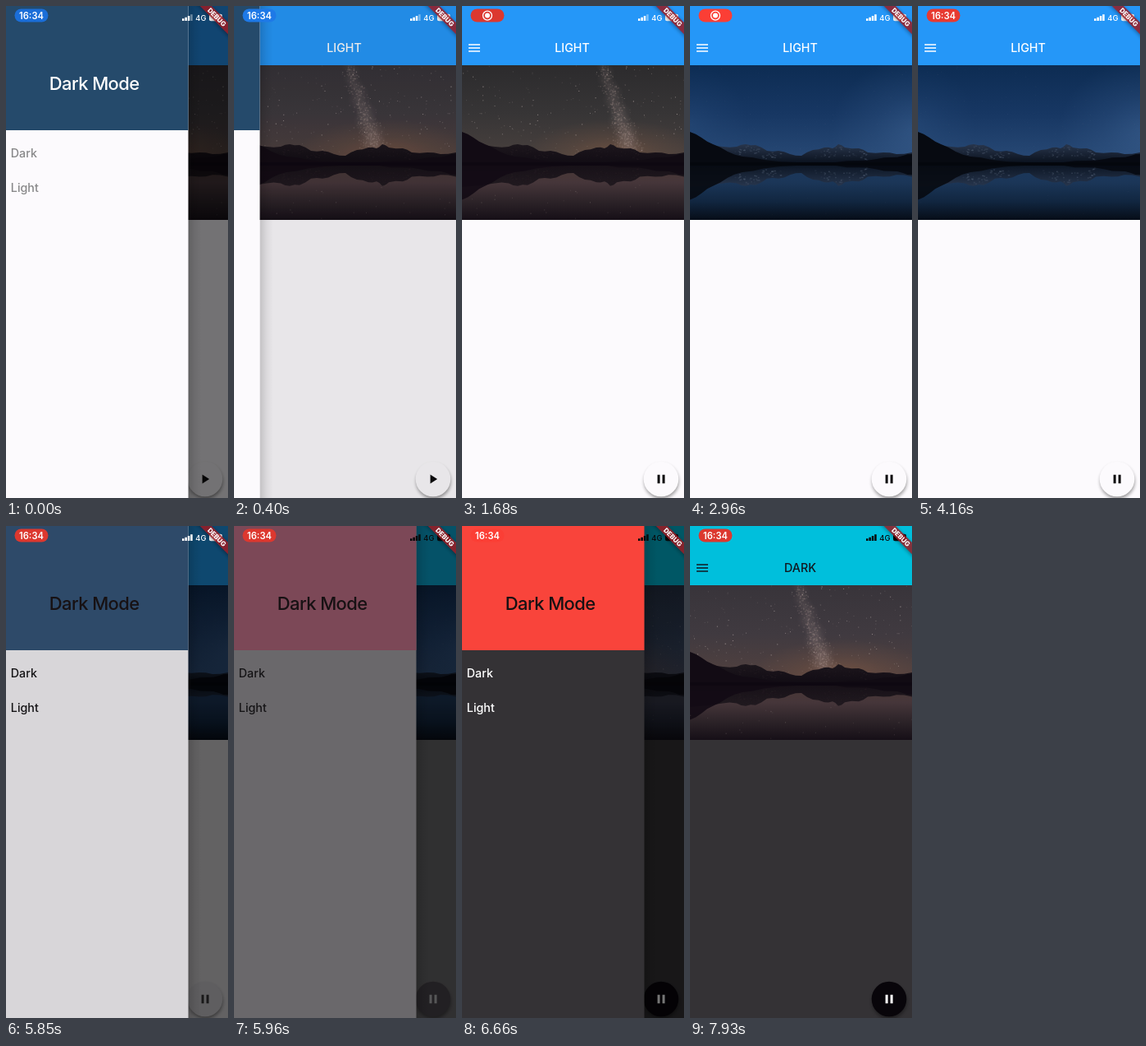
Write an HTML page with a canvas that moves like this. It is 271 px wide and 598 px high and loops after 7.99 s.

```html
<!DOCTYPE html>
<html lang="en">
<head>
<meta charset="utf-8">
<title>Theme drawer</title>
<style>
  html, body { margin: 0; width: 100%; height: 100%; overflow: hidden; background: #fcfafd; }
  canvas { position: absolute; left: 0; top: 72px; width: 271px; height: 189px; }
  svg { position: absolute; left: 0; top: 0; width: 271px; height: 598px; }
  text { font-family: Inter, Roboto, sans-serif; }
  .label { font-size: 14.3px; font-weight: 500; }
  .heading { font-size: 22px; letter-spacing: -.6px; font-weight: 500; }
</style>
</head>
<body>
<canvas id="video" width="271" height="189"></canvas>
<svg viewBox="0 0 271 598">
  <defs>
    <linearGradient id="edge">
      <stop offset="0" stop-opacity=".16"/>
      <stop offset=".5" stop-opacity=".06"/>
      <stop offset="1" stop-opacity="0"/>
    </linearGradient>
    <filter id="soft" x="-30%" y="-30%" width="160%" height="170%">
      <feGaussianBlur stdDeviation="2.2"/>
    </filter>
    <clipPath id="stage"><rect width="271" height="598"/></clipPath>
  </defs>
  <g clip-path="url(#stage)">
    <rect id="bar" width="271" height="72"/>
    <rect id="page" y="260" width="271" height="338"/>
    <g id="barInk">
      <path d="M8 46.2h14v1.6H8zM8 50.2h14v1.6H8zM8 54.2h14v1.6H8z"/>
      <text id="title" class="label" x="134.5" y="56.3" text-anchor="middle"></text>
    </g>
    <circle cx="243.5" cy="578" r="21" opacity=".4" filter="url(#soft)"/>
    <circle id="fab" cx="243" cy="575" r="21.3"/>
    <path id="fabIcon"/>
    <rect id="scrim" width="271" height="598"/>
    <g id="drawer">
      <rect x="222.5" width="16" height="598" fill="url(#edge)"/>
      <rect id="sheet" width="222.5" height="598"/>
      <rect id="header" width="222.5" height="151"/>
      <text id="heading" class="heading" x="107.7" y="102.3" text-anchor="middle">Dark Mode</text>
      <g id="items" class="label">
        <text x="5.8" y="183.8">Dark</text>
        <text x="5.8" y="225.8">Light</text>
      </g>
    </g>
    <rect id="pill" x="10.5" y="3.5" width="41" height="16" rx="8"/>
    <text id="clock" x="31" y="15.5" font-size="11.2" font-weight="600" fill="#fff" text-anchor="middle">16:34</text>
    <g id="record">
      <circle cx="31" cy="11.6" r="5.5" fill="none" stroke="#fff" stroke-width="1.3"/>
      <circle cx="31" cy="11.6" r="3" fill="#fff"/>
    </g>
    <g id="status">
      <path d="M215 15.2h2.5V18H215zM218.4 13.8h2.5V18h-2.5zM221.8 12.1h2.5V18h-2.5z"/>
      <path id="lastBar" d="M225.2 10.2h2.5V18h-2.5z"/>
      <text x="231.3" y="18" font-size="9.4" font-weight="500">4G</text>
      <rect x="248" y="9.7" width="16" height="8.6" rx="2.3"/>
    </g>
    <g transform="translate(271 0) rotate(45)">
      <rect x="-40" y="15" width="80" height="10.5" opacity=".35" filter="url(#soft)"/>
      <rect x="-40" y="14.2" width="80" height="10" fill="#a51f27" opacity=".8"/>
      <text y="22.1" font-size="8.1" font-weight="800" fill="#fff" text-anchor="middle">DEBUG</text>
    </g>
  </g>
</svg>
<script>
const LOOP = 7990;
const TIMES = { close: 250, play: 620, restart: 2430, clock: 4000, open: 4949, dark: 5815, closeAgain: 7250 };
const PLAY = "M239.6 569.6L248.2 575L239.6 580.4Z";
const PAUSE = "M238.6 569.8h3v10.4h-3zM244.6 569.8h3v10.4h-3z";

const el = id => document.getElementById(id);
const set = (id, attrs) => {
  for (const name in attrs) el(id).setAttribute(name, attrs[name]);
};
const clamp = x => Math.min(1, Math.max(0, x));
const smooth = x => { x = clamp(x); return x * x * (3 - 2 * x); };
const channels = hex => [1, 3, 5].map(i => parseInt(hex.slice(i, i + 2), 16));
const mix = (a, b, k) => {
  const to = channels(b);
  return `rgb(${channels(a).map((v, i) => Math.round(v + (to[i] - v) * k))})`;
};

// Critically damped spring, 0 to 1.
function spring(ms) {
  if (ms <= 0) return 0;
  const s = ms / 1000;
  return clamp(1.002 - (1 + 21.4 * s) * Math.exp(-22.4 * s));
}

function randomizer(seed) {
  return () => (seed = (seed * 16807) % 2147483647) / 2147483647;
}

const ctx = el("video").getContext("2d");
const W = 271, H = 189, SHORE = 119;
const random = randomizer(71);
const stars = Array.from({ length: 190 }, () => ({ x: random() * W, y: random() * 108, a: .12 + random() ** 3 * .55 }));
const dust = Array.from({ length: 420 }, () => ({
  along: random() ** .8, across: random() + random() + random() - 1.5, a: .05 + random() * .22
}));
const ridge = [[0, 95], [40, 99], [57, 99], [68, 96], [80, 97], [94, 104], [108, 104], [122, 108], [136, 110],
  [150, 103], [164, 100], [174, 101], [181, 96], [189, 100], [206, 101], [217, 106], [236, 106], [252, 108], [271, 106]];
const nearLeft = [[0, 81], [14, 88], [28, 96], [46, 105], [64, 111], [90, 115], [130, 118]];
const nearRight = [[178, 118], [205, 116], [228, 114], [246, 112], [260, 110], [271, 108]];

function gradient(y0, y1, ...colors) {
  const g = ctx.createLinearGradient(0, y0, 0, y1);
  colors.forEach((c, i) => g.addColorStop(i / (colors.length - 1), c));
  return g;
}

// Round glow, stretched horizontally by `stretch`.
function glow(x, y, r, rgb, alpha, stretch = 1) {
  ctx.save();
  ctx.translate(x, y);
  ctx.scale(stretch, 1);
  const g = ctx.createRadialGradient(0, 0, 0, 0, 0, r);
  g.addColorStop(0, `rgba(${rgb},${alpha})`);
  g.addColorStop(.5, `rgba(${rgb},${alpha * .4})`);
  g.addColorStop(1, `rgba(${rgb},0)`);
  ctx.fillStyle = g;
  ctx.fillRect(-r, -r, r * 2, r * 2);
  ctx.restore();
}

function land(points, fill) {
  ctx.beginPath();
  ctx.moveTo(points[0][0], SHORE + 1);
  points.forEach(([x, y], i) => {
    ctx.lineTo(x, y);
    const next = points[i + 1];
    if (next) ctx.lineTo((x + next[0]) / 2, (y + next[1]) / 2 + (i % 2 ? .8 : -.8));
  });
  ctx.lineTo(points[points.length - 1][0], SHORE + 1);
  ctx.fillStyle = fill;
  ctx.fill();
}

function snow(night) {
  const rock = randomizer(9);
  ctx.save();
  ctx.fillStyle = mix("#5d6b7f", "#292126", night);
  for (let i = 0; i < 90; i++) {
    const x = i < 45 ? 52 + rock() * 58 : 150 + rock() * 66;
    const n = ridge.findIndex(p => p[0] > x);
    const [a, b] = [ridge[n - 1], ridge[n]];
    const top = a[1] + (b[1] - a[1]) * (x - a[0]) / (b[0] - a[0]);
    ctx.globalAlpha = .1 + rock() * .35;
    ctx.fillRect(x, top + 1.5 + rock() * 9, 1 + rock() * 2, 1.3);
  }
  ctx.restore();
}

function mountains(night) {
  land(ridge, gradient(97, SHORE, mix("#27344a", "#1c161c", night), mix("#0a111d", "#110c14", night)));
  snow(night);
  land(nearLeft, mix("#070a11", "#120b14", night));
  land(nearRight, mix("#060911", "#110b13", night));
}

function drawSky(night, late) {
  const tint = (day, early, end) => night < 1 ? mix(day, early, night) : mix(early, end, late);
  ctx.fillStyle = gradient(0, SHORE, tint("#0d2c53", "#38343a", "#2c2b2d"),
    tint("#173763", "#403a40", "#373536"), tint("#294a76", "#54423f", "#4b423f"));
  ctx.fillRect(0, 0, W, SHORE);
  ctx.globalAlpha = 1 - night;
  glow(280, 80, 90, "75,115,165", .4, 1.2);
  glow(0, 70, 70, "60,100,150", .2);
  ctx.globalAlpha = night;
  glow(185, 108, 42, "150,100,70", .45, 2.6);
  ctx.globalAlpha = 1;
}

function drawStars(night, shift) {
  ctx.fillStyle = "#e4d5cf";
  for (const s of stars) {
    ctx.globalAlpha = s.a * (.1 + .9 * night);
    ctx.fillRect(((s.x + shift) % W + W) % W, s.y, 1, 1);
  }
  const band = along => 132 + shift + along * 33;
  ctx.globalAlpha = night;
  for (let i = 0; i <= 12; i++) {
    const along = i / 12;
    glow(band(along) + 3 * Math.sin(i * 2.1), along * 100, 9 + 8 * along, "165,145,142", .12 + .09 * along);
  }
  ctx.fillStyle = "#b9a49d";
  for (const d of dust) {
    ctx.globalAlpha = d.a * night;
    ctx.fillRect(band(d.along) + d.across * (8 + 8 * d.along), d.along * 106, 1.5, 1.5);
  }
  ctx.globalAlpha = 1;
}

function drawWater(night, shift) {
  ctx.fillStyle = gradient(SHORE, H, mix("#1c385c", "#4a3935", night), mix("#1b3658", "#46363a", night),
    mix("#112640", "#2c2328", night), mix("#060c16", "#150e16", night));
  ctx.fillRect(0, SHORE, W, H - SHORE);
  ctx.save();
  ctx.beginPath();
  ctx.rect(0, SHORE, W, H);
  ctx.clip();
  ctx.translate(0, SHORE * 2.12 + 2);
  ctx.scale(1, -1.12);
  ctx.globalAlpha = .9;
  mountains(night);
  ctx.restore();
  ctx.fillStyle = mix("#04070d", "#0e0811", night);
  ctx.fillRect(0, SHORE - 1, W, 4);
  ctx.fillStyle = "#cfc3b8";
  for (const s of stars.slice(0, 24)) {
    ctx.globalAlpha = (.05 + s.a * .4) * (.2 + .8 * night);
    ctx.fillRect(((s.x + shift) % W + W) % W, 143 + s.y * .4, 1, 1.3);
  }
  ctx.globalAlpha = 1;
}

function drawVideo(sec) {
  const night = smooth((sec - 3.3) / 1.7);
  const late = clamp((sec - 5.5) / 1.2);
  const shift = (sec - 5.5) * 30;
  drawSky(night, late);
  drawStars(night, shift);
  mountains(night);
  drawWater(night, shift);
}

function videoTime(t) {
  return t < TIMES.restart ? 5.77 + Math.max(0, t - TIMES.play) / 1000 : (t - TIMES.restart) / 1000;
}

function render(t) {
  const open = t < TIMES.open ? 1 - spring(t - TIMES.close)
    : spring(t - TIMES.open) - spring(t - TIMES.closeAgain);
  const theme = clamp((t - TIMES.dark) / 200);
  const isDark = t >= TIMES.dark;
  const itemInk = t < 1000 ? clamp(.5 - t / 200) : clamp((t - 5960) / 220);
  const ink = mix("#ffffff", "#111820", theme);

  drawVideo(videoTime(t));
  set("bar", { fill: mix("#2597f8", "#00bfdc", theme) });
  set("page", { fill: mix("#fcfafd", "#343235", theme) });
  set("barInk", { fill: ink });
  el("title").textContent = isDark ? "DARK" : "LIGHT";
  set("fab", { fill: mix("#fcfafd", "#08050a", theme) });
  set("fabIcon", { fill: mix("#0c0b0d", "#ffffff", theme), d: t < TIMES.play ? PLAY : PAUSE });
  set("scrim", { "fill-opacity": .54 * open });

  set("drawer", {
    transform: `translate(${(open - 1) * 222.5} 0)`,
    visibility: open > .002 ? "visible" : "hidden"
  });
  set("sheet", { fill: mix("#fcfafd", "#343235", theme) });
  set("header", { fill: mix("#254a6b", "#f9443b", clamp((t - 5838) / 300)) });
  set("heading", { fill: isDark ? "#171113" : "#ffffff" });
  set("items", { fill: mix("#141315", "#ffffff", itemInk) });

  const pulse = .5 - .5 * Math.cos((t - 1680) / 2085 * 2 * Math.PI);
  const recording = t >= 700;
  const showIcon = recording && t < TIMES.clock;
  set("pill", { fill: recording ? mix("#dc382f", "#ff3f36", pulse) : mix("#1968cf", "#1f7bea", pulse) });
  set("clock", { visibility: showIcon ? "hidden" : "visible" });
  set("record", { visibility: showIcon ? "visible" : "hidden" });
  set("status", { fill: t < 5920 ? "#ffffff" : "#080a0c" });
  set("lastBar", { opacity: t < 2300 ? .4 : 1 });
}

const start = performance.now();
function tick() {
  render((performance.now() - start) % LOOP);
  requestAnimationFrame(tick);
}
tick();
</script>
</body>
</html>
```
